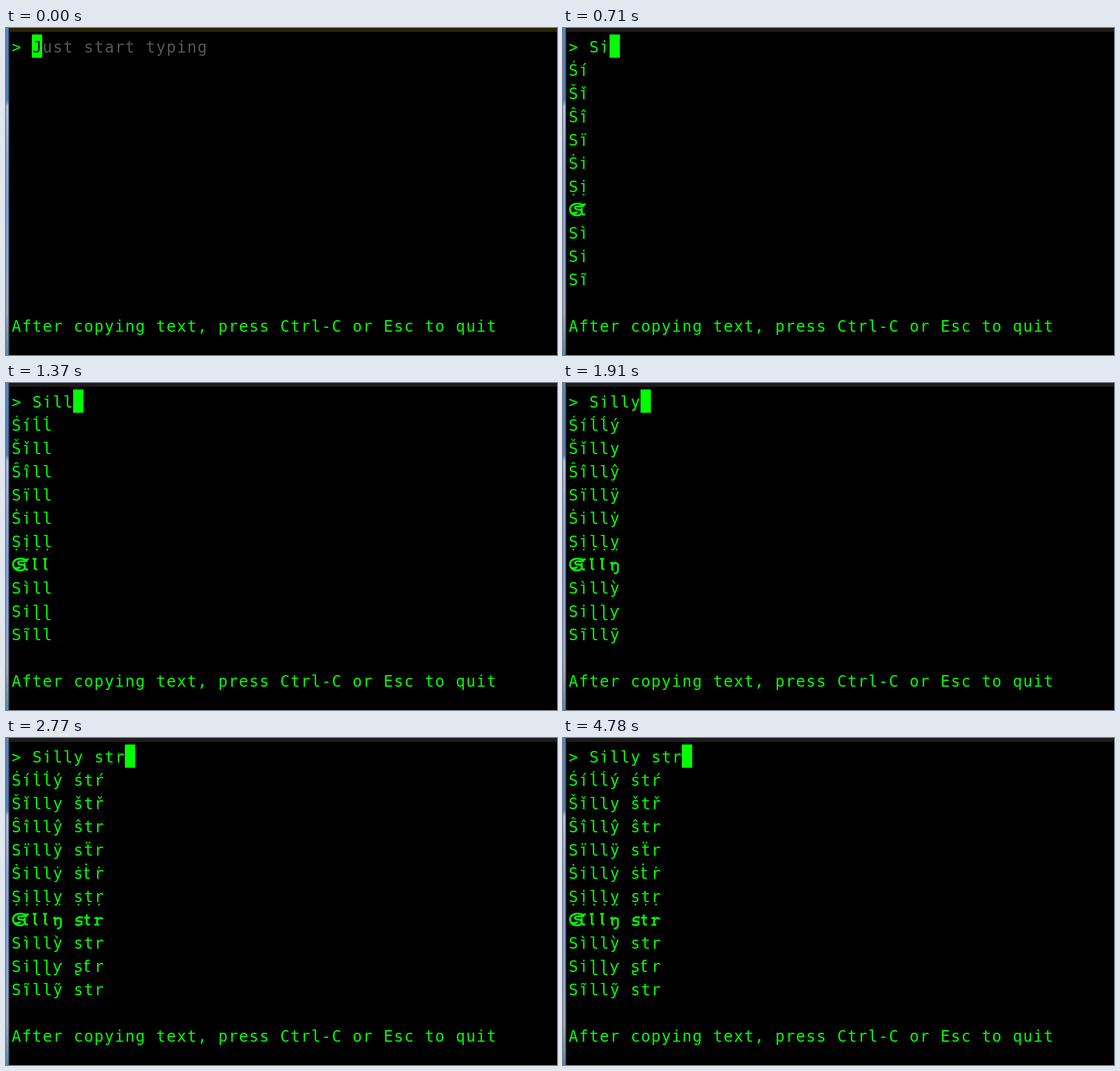
Animation, 853 px wide and 506 px high, one loop 5.4 s. Source, as an HTML page:

```html
<!DOCTYPE html>
<html lang="en">
<head>
<meta charset="utf-8">
<title>Terminal typing</title>
<style>
  html, body { margin: 0; width: 100%; height: 100%; overflow: hidden; background: #000; }
  svg { display: block; width: 853px; height: 506px; }
  text {
    font: 24.2px "DejaVu Sans Mono", "Noto Sans Mono", monospace;
    fill: #0f0;
    white-space: pre;
  }
  .cell { text-anchor: middle; }
  .run { letter-spacing: 1.43px; }
  .wide { font: 25px "DejaVu Sans", sans-serif; }
  .hint { fill: #565656; }
  .black { fill: #000; }
  .fraktur { fill: none; stroke: #0f0; stroke-width: 2.8; }
</style>
</head>
<body>
<svg viewBox="0 0 853 506">
  <defs>
    <linearGradient id="edge" x1="0" y1="0" x2="0" y2="1">
      <stop offset="0" stop-color="#5683c0"/>
      <stop offset=".22" stop-color="#4a80b8"/>
      <stop offset=".24" stop-color="#a9bce0"/>
      <stop offset=".4" stop-color="#8ba6d8"/>
      <stop offset=".55" stop-color="#7f9fdc"/>
      <stop offset=".75" stop-color="#8aa4d4"/>
      <stop offset=".87" stop-color="#9aa3b4"/>
      <stop offset="1" stop-color="#5289a4"/>
    </linearGradient>
  </defs>
  <rect width="853" height="506"/>
  <rect id="bar" width="853" height="6" fill="#1d1b1c"/>
  <rect width="4" height="506" fill="url(#edge)"/>
  <rect x="4" width="2" height="506" fill="#24231c"/>
  <rect id="cursor" y="10" width="16" height="36" fill="#0f0"/>
  <text class="run" x="8.7" y="38">&gt;</text>
  <g id="hint">
    <text class="cell black" x="48" y="38">J</text>
    <text class="run hint" x="56.7" y="38">ust start typing</text>
  </g>
  <g id="typed"></g>
  <text class="run" x="8.7" y="470">After copying text, press Ctrl-C or Esc to quit</text>
</svg>
<script>
const LOOP = 5400, CELL = 16, ROW = 36, LEFT = 8, BASE = 38;
const phrase = "Silly str";
// Moment at which each character of the phrase is typed
const keyTimes = [140, 710, 1060, 1370, 1670, 2110, 2380, 2710, 2770];

// Styled versions by row; null is the blackletter row
const styles = [
  "Śíĺĺý śtŕ", "Šǐlly štř", "Ŝîllŷ ŝtr", "Sïllÿ sẗr", "Ṡillẏ ṡṫṙ",
  "Ṣịḷḷỵ ṣṭṛ", null, "Sìllỳ str", "Siɭɭƴ ʂƭr", "Sĩllỹ str"
];

const blackletter = {
  S: "M27 -18C23 -14 18 -20 12 -18C4 -17 1 -11 4 -5C7 1 17 1 20 -2C23 -6 20 -9 16 -9C10 -9 9 -13 13 -14C17 -15 20 -13 25 -15M6 -4C10 -3 13 -4 14 -6",
  i: "M5 -12V-3L8 -1L10 -2",
  l: "M2 -19L4.5 -16V-3L8 -1M4 -16L7 -19",
  y: "M1 -11L4 -12V-2L6 0M4 -9L9 -12L13 -10V-1C13 3 10 6 7 4",
  s: "M15 -12L9 -13L5 -10V-7L13 -6V-2L8 0L3 -2",
  t: "M5 -17V-3L7 -1L10 -2M1 -12H10",
  r: "M1 -11L5 -12V-2L8 0M1 -1H4M5 -9L10 -12L14 -10"
};

const byId = id => document.getElementById(id);
const bar = byId("bar"), cursor = byId("cursor"), hint = byId("hint");

function add(parent, tag, attrs, text = "") {
  const el = document.createElementNS("http://www.w3.org/2000/svg", tag);
  for (const key in attrs) el.setAttribute(key, attrs[key]);
  el.textContent = text;
  return parent.appendChild(el);
}

function putChar(parent, ch, col, row) {
  if (ch === " ") return;
  const x = LEFT + col * CELL, y = BASE + row * ROW;
  const wide = "ṫƭ".includes(ch);
  add(parent, "text", { class: wide ? "cell wide" : "cell", x: x + (wide ? 5.5 : 8), y }, ch);
  // Trim the foot serif so that the i ends in a bare stem
  if ("iíǐîïịìĩ".includes(ch)) {
    add(parent, "rect", { x, y: y - 2.4, width: 6.7, height: 2.8 });
    add(parent, "rect", { x: x + 9.5, y: y - 2.4, width: 6.5, height: 2.8 });
  }
}

const columns = [...phrase].map((ch, i) => {
  const group = add(byId("typed"), "g", {});
  putChar(group, ch, i + 2, 0);
  styles.forEach((style, r) => {
    if (style) putChar(group, [...style][i], i, r + 1);
    else if (blackletter[ch]) add(group, "path", {
      class: "fraktur",
      d: blackletter[ch],
      transform: `translate(${LEFT + i * CELL} ${BASE + (r + 1) * ROW})`
    });
  });
  return group;
});

function draw(now) {
  const t = now % LOOP;
  const count = keyTimes.filter(k => k <= t).length;
  columns.forEach((g, i) => g.setAttribute("display", i < count ? "inline" : "none"));
  hint.setAttribute("display", count ? "none" : "inline");
  bar.setAttribute("fill", count ? "#1d1b1c" : "#29230a");
  cursor.setAttribute("x", LEFT + (count + 2) * CELL);
}

const start = performance.now();
function tick() {
  draw(performance.now() - start);
  requestAnimationFrame(tick);
}
tick();
</script>
</body>
</html>
```
